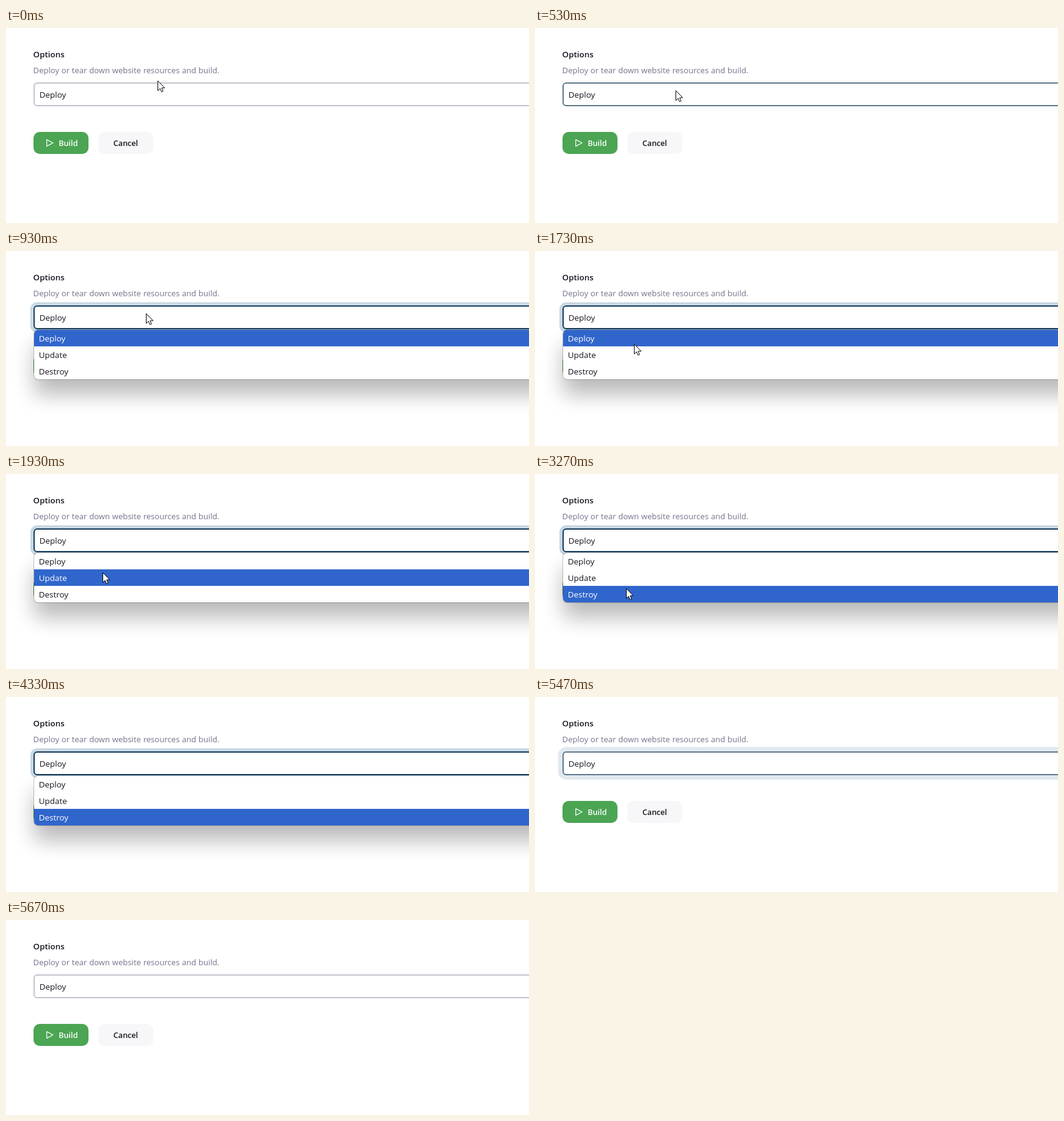
Animation, 856 px wide and 319 px high, one loop 5940 ms. Source, as an HTML page:

```html
<!DOCTYPE html>
<html lang="en">
<head>
<meta charset="utf-8">
<title>Build options</title>
<style>
  html, body { margin: 0; width: 100%; height: 100%; overflow: hidden; background: #fff; }
  svg { display: block; width: 856px; height: 319px; }
  text { font: 13.4px "Open Sans", "Noto Sans", sans-serif; fill: #14141f; }
  .bold { font-weight: 600; }
  .hint { font-size: 13.08px; word-spacing: .4px; fill: #73738c; }
  .button { font-size: 12.6px; font-weight: 600; }
  .light, .active text { fill: #fff; }
  .row rect { fill: #fff; }
  .active rect { fill: #3066cc; }
</style>
</head>
<body>
<svg viewBox="0 0 856 319">
  <defs>
    <filter id="blur" filterUnits="userSpaceOnUse" x="-60" y="60" width="1200" height="300">
      <feGaussianBlur stdDeviation="17"/>
    </filter>
    <clipPath id="panel"><rect x="46" y="129" width="1000" height="81" rx="7"/></clipPath>
  </defs>

  <text class="bold" x="44.6" y="48">Options</text>
  <text class="hint" x="44.6" y="74">Deploy or tear down website resources and build.</text>

  <rect x="45" y="170" width="90" height="36" rx="10" fill="#4ba553"/>
  <path d="M66.7 182.6V193.4L77 188Z" fill="none" stroke="#fff" stroke-width="1.2" stroke-linejoin="round"/>
  <text class="button light" x="86.3" y="193">Build</text>
  <rect x="151" y="170" width="90" height="36" rx="10" fill="#f7f7fa"/>
  <text class="button" x="196" y="193" text-anchor="middle">Cancel</text>

  <rect id="ring" fill="#125484"/>
  <rect id="field" x="46" y="90" width="1000" height="37" rx="5" fill="#fff" stroke-width="2"/>
  <text x="54.8" y="114">Deploy</text>

  <g id="popup">
    <rect x="46" y="154" width="1000" height="81" rx="7" opacity=".27" filter="url(#blur)"/>
    <rect x="45" y="128" width="1002" height="83" rx="8" opacity=".22"/>
    <g id="rows" clip-path="url(#panel)"></g>
  </g>

  <path id="cursor" d="M.5 .5V16.5L4.2 13L6.6 18.5L9.1 17.4L6.8 12H11.8Z" fill="#fff" stroke="#000"/>
</svg>
<script>
const LOOP = 5940, FPS = 15;
const $ = id => document.getElementById(id);
const clamp = v => Math.min(1, Math.max(0, v));
const easeOut = v => 1 - (1 - v) ** 2;
const lerp = (a, b, v) => a + (b - a) * v;
const mix = (a, b, v) => a.map((c, i) => lerp(c, b[i], v));

const IDLE = [195, 195, 207], HOVER = [92, 120, 137], FOCUS = [18, 58, 92];

// Pointer path: tick, x, y
const path = [
  [0, 248, 86], [5, 231, 105], [6, 231, 105], [8, 230, 102], [12, 230, 102],
  [13, 229, 102], [19, 229, 102], [26, 162, 152], [28, 158, 160], [30, 158, 162],
  [39, 158, 162], [41, 154, 174], [43, 150, 187], [48, 150, 187], [49, 149, 187],
  [63, 149, 187], [64, 143, 275]
];

$("rows").innerHTML = ["Deploy", "Update", "Destroy"].map((name, i) =>
  `<g class="row"><rect x="46" y="${129 + 27 * i}" width="1000" height="27"/>` +
  `<text x="53.8" y="${148 + 27 * i}">${name}</text></g>`).join("");
const rows = [...$("rows").children];

function pointer(k) {
  const i = path.findIndex(p => p[0] >= k);
  if (i < 1) return path[i < 0 ? path.length - 1 : 0].slice(1);
  const [a, b] = [path[i - 1], path[i]];
  const v = (k - a[0]) / (b[0] - a[0]);
  return [1, 2].map(n => Math.round(lerp(a[n], b[n], v)));
}

function show(id, on) {
  $(id).style.display = on ? "" : "none";
}

function draw(k) {
  const closing = k >= 82;
  const hover = closing ? 0 : easeOut(clamp(k / 5));
  const focus = closing ? 1 - easeOut(clamp((k - 81) / 4)) : easeOut(clamp((k - 11) / 4));
  $("field").setAttribute("stroke", `rgb(${mix(mix(IDLE, HOVER, hover), FOCUS, focus)})`);

  // The glow shrinks towards the field as it fades in
  const spread = lerp(10, 5, focus);
  const box = { x: 45 - spread, y: 89 - spread, width: 1002 + 2 * spread,
                height: 39 + 2 * spread, rx: 6 + spread, opacity: .23 * focus };
  for (const key in box) $("ring").setAttribute(key, box[key]);

  show("popup", k >= 13 && !closing);
  const [x, y] = pointer(k);
  const active = k >= 43 ? 2 : y >= 183 ? 2 : y >= 156 ? 1 : 0;
  rows.forEach((row, i) => row.classList.toggle("active", i === active));

  show("cursor", k < 65);
  $("cursor").setAttribute("transform", `translate(${x} ${y})`);
}

const start = performance.now();
function tick() {
  const t = (performance.now() - start) % LOOP;
  draw(Math.min(88, Math.floor((t + 4) * FPS / 1000)));
  requestAnimationFrame(tick);
}
tick();
</script>
</body>
</html>
```
